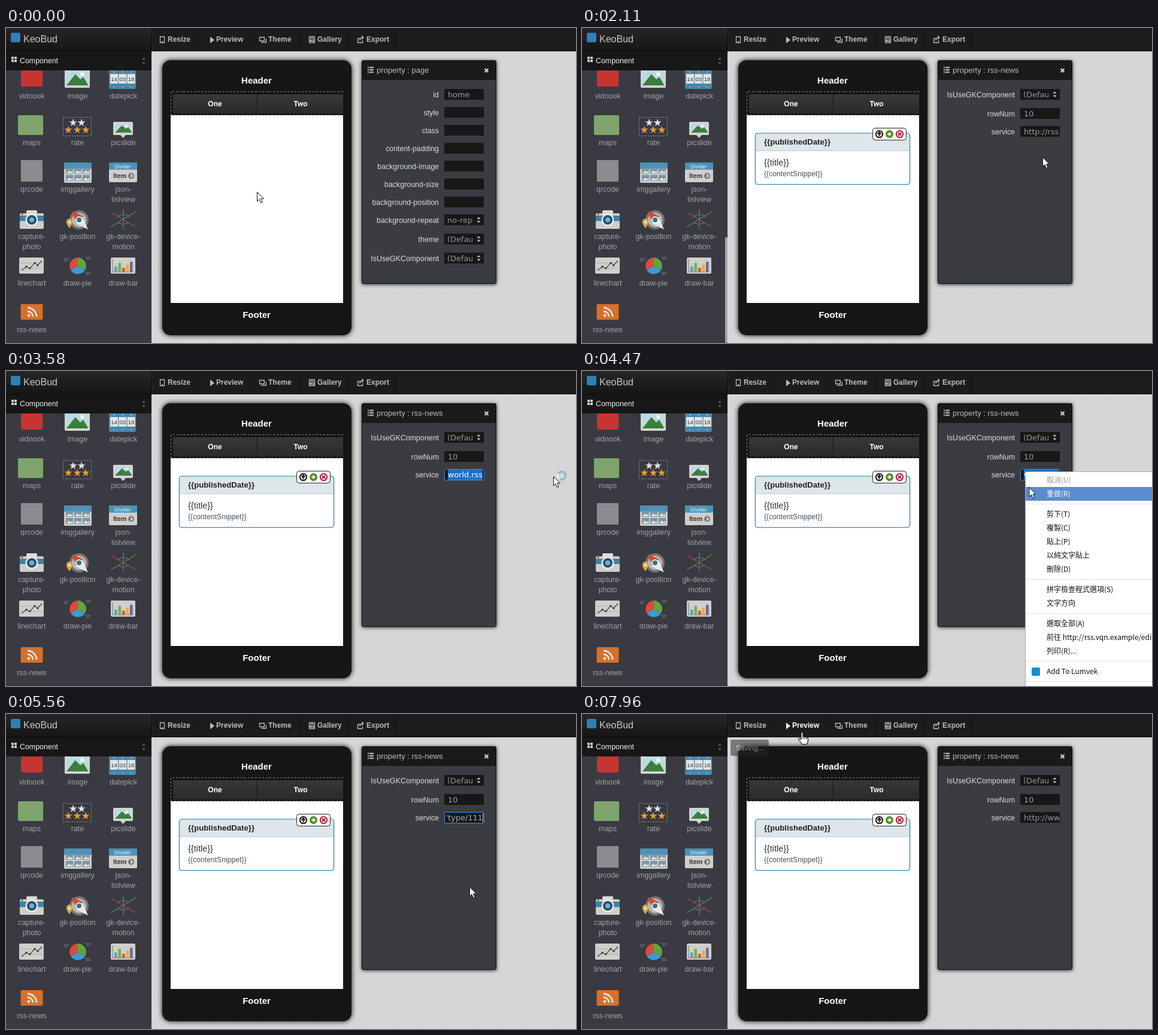
Animation of 952 by 527 pixels, one loop 8 s. Source, as an HTML page:

```html
<!DOCTYPE html>
<html lang="en">
<head>
<meta charset="utf-8">
<title>App builder</title>
<style>
html, body { margin: 0; width: 100%; height: 100%; overflow: hidden; background: #d6d6d6; }
svg { display: block; width: 952px; height: 527px; font-family: "Liberation Sans", Arial, sans-serif; }
text { white-space: pre; }
.b { font-weight: bold; }
.v { font-family: "DejaVu Sans", Verdana, sans-serif; }
.cjk { font-family: "Noto Sans CJK TC", "Noto Sans CJK", sans-serif; }
.m { text-anchor: middle; }
.e { text-anchor: end; }
</style>
</head>
<body>
<script>
const rect = (x, y, w, h, fill, more = '') => `<rect x="${x}" y="${y}" width="${w}" height="${h}" fill="${fill}" ${more}/>`;
const circle = (x, y, r, fill, more = '') => `<circle cx="${x}" cy="${y}" r="${r}" fill="${fill}" ${more}/>`;
const path = (d, fill = 'none', stroke = 'none', width = 1, more = '') =>
  `<path d="${d}" fill="${fill}" stroke="${stroke}" stroke-width="${width}" ${more}/>`;
const text = (x, y, s, size = 12.4, fill = '#ddd', cls = '', more = '') =>
  `<text x="${x}" y="${y}" font-size="${size}" fill="${fill}" class="${cls}" ${more}>${s}</text>`;
const group = (id, body, more = '') => `<g id="${id}" ${more}>${body}</g>`;

// Sidebar icons
const picture = (x, y, w, h) => rect(x, y, w, h, '#d4d4cc', 'rx="2"') + rect(x + 3, y + 3, w - 6, h - 6, '#b9dbe6') +
  path(`M${x + 3} ${y + h - 4}l${w * .35} ${-h * .55} ${w * .2} ${h * .25} ${w * .12} ${-h * .12} ${w * .2} ${h * .42}z`, '#3d7d3a') +
  circle(x + w * .7, y + h * .32, h * .1, '#f4f4e0');
const card = (x, y, w, h) => rect(x, y, w, h, '#cfcfcb', 'rx="2"');
const blueCard = (x, y, w, h) => card(x, y, w, h) + rect(x, y, w, 11, '#4b93b8', 'rx="2"');
const star = (x, y, fill) => text(x, y, '★', 17, fill, 'v m');
const feed = rect(-18.5, -13, 37, 26, '#f47b25', 'rx="2"') + circle(-5, 6, 2.4, '#fff') +
  path('M-7 -1a9 9 0 0 1 9 9M-7 -7a15 15 0 0 1 15 15', 'none', '#fff', 2.8);

const icons = [
  rect(25, 68, 36, 30, '#c93430', 'rx="3"'),
  picture(98, 66, 42, 34),
  rect(172, 66, 45, 36, '#4687ab', 'rx="3"') +
    [14, '03', 18].map((n, i) => rect(174 + 14.3 * i, 77, 13, 16, '#e4e4e0') + text(180.5 + 14.3 * i, 89, n, 9.5, '#333', 'm') +
      text(180.5 + 14.3 * i, 76, '+', 8, '#cde', 'm') + text(180.5 + 14.3 * i, 101, '−', 8, '#cde', 'm')).join(''),
  rect(20, 146, 42, 33, '#7fa56c', 'rx="2"'),
  rect(95.5, 149.5, 47, 31, 'none', 'stroke="#999" stroke-dasharray="2 2"') +
    [112, 126].map(x => star(x, 164, '#e4e4e4')).join('') + [104, 119, 133].map(x => star(x, 176, '#eca02c')).join(''),
  picture(179, 157, 33, 22) + path('M191 179h9l-4.500 5z', '#d4d4cc'),
  rect(25, 221, 36, 36, '#8c8c8e'),
  blueCard(97, 225, 46, 34) + [0, 1, 2, 3, 4, 5].map(i => {
    const x = 100 + i % 3 * 14, y = 234 + (i / 3 | 0) * 12;
    return rect(x, y, 12, 10, '#7d94a0') + path(`M${x + 1} ${y + 9}l4 -5 3 3 3 -2v4z`, '#dfe6e8');
  }).join(''),
  blueCard(172, 225, 47, 33) + rect(172, 233, 47, 4, '#4b93b8') + text(195, 235, 'Divider', 9, '#eef', 'm') +
    text(179, 251, 'Item', 11, '#333', 'b') + circle(209, 247.500, 5, '#777') + path('M208 245l3 2.500-3 2.500', 'none', '#fff', 1.5),
  card(23, 310, 40, 26) + rect(34, 305, 18, 8, '#dcdcd8', 'rx="2"') + rect(23, 314, 40, 9, '#3f83a6') +
    circle(43, 321, 10.500, '#eee') + circle(43, 321, 8, '#26506c') + circle(43, 321, 4, '#6fb2d4') + circle(27, 312, 1.5, '#c33'),
  circle(122, 321, 16, '#77777a') + circle(122, 321, 12, '#b9b9b6') + path('M109 306l20 9-11 11z', '#d9452c') +
    path('M137 337l-20-10 11-11z', '#e8e8e8') + circle(122, 321, 5, '#2f7393', 'stroke="#eee" stroke-width="2"') +
    path('M106 335q-6-8-5-11a5 5 0 0 1 10 0q0 3-5 11z', '#e0a737') + circle(106, 325, 2, '#fff'),
  path('M175 333L217 307', 'none', '#437f46', 1.5) + path('M176 309L216 332', 'none', '#8f4444', 1.5) +
    path('M196 303V337', 'none', '#4f6fa8', 1.5) + path('M186 316q10-8 20 0M187 325q8 6 18 0', 'none', '#777', 1.2),
  card(22, 384, 41, 27) + path('M24 393h37M24 402h37', 'none', '#aaa') +
    path('M26 406l8-7 6 3 8-9 5 4 7-8', 'none', '#444', 1.2) +
    [[34, 399], [40, 402], [48, 393], [53, 397]].map(([x, y]) => circle(x, y, 1.6, '#333')).join(''),
  path('M120 398V384a14 14 0 0 1 12 21z', '#62a53c') + path('M120 398L132 405a14 14 0 0 1-24 0z', '#3d9bd0') +
    path('M120 398L108 405a14 14 0 0 1 12-21z', '#dc4a38') +
    path('M97 386h9M97 389h6M133 384h9M135 387h6M132 409h9M134 412h7', 'none', '#96968f', 1, 'stroke-dasharray="3 1"'),
  card(175, 384, 41, 27) + path('M178 387v21h35', 'none', '#777') +
    [[9, '#5f9ec5'], [15, '#78ad4c'], [7, '#d0564a'], [12, '#e0b23c'], [17, '#79619c']]
      .map(([h, c], i) => rect(181 + 6.5 * i, 408 - h, 4.5, h, c)).join(''),
  group('feed', feed, 'transform="translate(43 475)"')
];
const labels = ['vidnook', 'image', 'datepick', 'maps', 'rate', 'picslide', 'qrcode', 'imggallery', 'json-/listview',
  'capture-/photo', 'gk-position', 'gk-device-/motion', 'linechart', 'draw-pie', 'draw-bar', 'rss-news'];
const rowY = [118, 196, 274, 353, 431, 509];
const sidebar = rect(0, 39, 243, 488, '#3a3a42') + icons.join('') +
  labels.map((s, i) => s.split('/').map((part, k) =>
    text(43 + 76.500 * (i % 3), rowY[i / 3 | 0] + 17 * k, part, 12.4, '#a2a2a2', 'm')).join('')).join('') +
  group('bar', rect(239, 350, 4, 177, '#a8a8ac', 'rx="2"')) +
  rect(0, 39, 243, 32, '#171717') + path('M9 48h4v4h-4zM14 48h4v4h-4zM9 53h4v4h-4zM14 53h4v4h-4z', '#ccc') +
  text(23, 59, 'Component', 12.4, '#eee') + path('M227 53l3-4 3 4zM227 57l3 4 3-4z', '#555');

const navItem = (x, s, icon, id) => group(id, text(x, 23, s, 12, 'currentColor', 'b') + icon, 'color="#bbb"');
const line = (d, width = 1.3) => path(d, 'none', 'currentColor', width);
const topBar = rect(0, 0, 952, 39, '#1c1c1c') + rect(0, 0, 243, 38, 'url(#brand)') + rect(0, 38, 952, 1, '#0a0a0a') +
  [243, 324, 408, 492, 572, 651].map(x => rect(x, 0, 1, 38, '#050505') + rect(x + 1, 0, 1, 38, '#2c2c2c')).join('') +
  rect(8, 8, 16, 16, '#2d7fba', 'rx="3"') + text(29, 24, 'KeoBud', 16, '#c8c8c8') +
  navItem(270, 'Resize', line('M257.500 14.500h7v10h-7zM260 23h2'), 'resize') +
  navItem(351, 'Preview', path('M341 14.500l7 5.500-7 5.500z', 'currentColor'), 'preview') +
  navItem(438, 'Theme', line('M423.500 15.500h8v6h-8zM426 24h8.500v-6'), 'theme') +
  navItem(520, 'Gallery', line('M506.500 14.500h9v10h-9zM508 17h6M508 20h3v2h-3zM512 20h3M512 22.500h3'), 'gallery') +
  navItem(602, 'Export', line('M592 17.500h-4.500v7h8v-4M591 21q0-5 6-5M594 13l3 3-3 3'), 'export');

const phone = rect(261, 54, 316, 460, '#181818', 'rx="14" filter="url(#halo)"') +
  text(418.5, 93, 'Header', 15, '#fff', 'b m') + text(418.5, 485, 'Footer', 15, '#fff', 'b m') +
  path('M563 106.500H275.500V145.500', 'none', '#8a8a8a', 1, 'stroke-dasharray="3 3"') +
  rect(279, 111, 140, 32, 'url(#button)') + rect(420, 111, 143, 32, 'url(#button)') +
  text(349, 131, 'One', 12, '#fff', 'b m') + text(492, 131, 'Two', 12, '#fff', 'b m') +
  rect(275, 146, 288, 314, '#fff') + path('M275 145.500h288', 'none', '#666', 1, 'stroke-dasharray="3 3"');

const widget = rect(289.5, 176, 258, 85.5, '#fff', 'rx="4" filter="url(#glow)"') +
  path('M290 206V180q0-4 4-4h249q4 0 4 4v26z', '#dde6e9') + rect(290, 205, 257, 1, '#c4ced2') +
  rect(289.5, 176, 258, 85.5, 'none', 'rx="4" stroke="#3a87b0" stroke-width="1.2"') +
  text(304, 195, '{{publishedDate}}', 13.15, '#222', 'b') + text(304, 230, '{{title}}', 14.5, '#333') +
  text(304, 248, '{{contentSnippet}}', 12.2, '#4a5560');
const ring = (x, c, d) => circle(x, 177.5, 5.6, '#fff', `stroke="${c}" stroke-width="2"`) + path(d, 'none', c, 2);
const tools = rect(485.5, 167.5, 56, 20, '#fff', 'rx="4" stroke="#222"') +
  ring(496.5, '#111', 'M496.500 181v-6M493.500 177.500l3-3 3 3') +
  circle(513.5, 177.5, 6.5, '#4f8a1c') + path('M510 177.500h7M513.500 174v7', 'none', '#fff', 2) +
  ring(530.5, '#b5173c', 'M528 175l5 5M533 175l-5 5');

const label = (y, s) => text(723, y + 4.5, s, 12.4, '#ddd', 'e');
const input = (y, name, value = '') => label(y, name) + rect(732, y - 9, 66, 18, '#171717') +
  text(738, y + 5, value, 12.9, '#999', 'v', 'clip-path="url(#field)"');
const select = (y, name, value) => label(y, name) + rect(732, y - 9, 66, 18, '#171717') +
  text(737, y + 5, value, 12.9, '#999', 'v', 'clip-path="url(#option)"') +
  path(`M786.500 ${y - 1.5}l3 -3.500 3 3.500zM786.500 ${y + 1.5}l3 3.500 3 -3.500z`, '#bbb');
const panel = rect(594.5, 54.5, 224, 373, '#3a3a42', 'rx="2" stroke="#111" filter="url(#shadow)"') +
  rect(595, 55, 223, 32, '#1a1a1a') + path('M604 66h2m1 0h7M604 70h2m1 0h7M604 74h2m1 0h7', 'none', '#aaa', 2.6) +
  text(619, 75, '', 13, '#bbb', '', 'id="title"') + path('M799.500 68l6 6M805.500 68l-6 6', 'none', '#ddd', 2) +
  group('pageProps', input(111, 'id', 'home') +
    ['style', 'class', 'content-padding', 'background-image', 'background-size', 'background-position']
      .map((s, i) => input(141 + 30 * i, s)).join('') +
    select(321, 'background-repeat', 'no-repeat') + select(353, 'theme', '(Default)') + select(385, 'IsUseGKComponent', '(Default)')) +
  group('feedProps', select(111, 'IsUseGKComponent', '(Default)') + input(143, 'rowNum', '10') + input(173, 'service') +
    rect(738, 165, 0, 17, '#1b6fc6', 'id="selection"') +
    text(738, 178, '', 12.9, '#999', 'v', 'id="service" clip-path="url(#field)"') +
    rect(732.5, 164.5, 66, 18, 'none', 'id="focus" stroke="#4a90d9" rx="1"') + rect(796, 166, 1, 15, '#ddd', 'id="caret"'));

const menuRows = [[182, '取消(U)'], [205, '重做(R)'], [239, '剪下(T)'], [262, '複製(C)'], [285, '貼上(P)'], [308, '以純文字貼上'],
  [331, '刪除(D)'], [365, '拼字檢查程式選項(S)'], [388, '文字方向'], [422, '選取全部(A)'],
  [445, '前往 http://rss.vqn.example/edit'], [468, '列印(R)...'], [502, 'Add To Lumvek']];
const menu = rect(740.5, 168.5, 230, 380, '#fff', 'stroke="#aaa"') + rect(741, 274, 211, 23, '#5b8bd0', 'id="hover"') +
  [222, 348, 405, 485, 519].map(y => rect(741, y, 211, 1, '#e4e4e4')).join('') +
  menuRows.map(([y, s], i) => text(776, y + 4.5, s, 12, '', 'cjk', `id="row${i}"`)).join('') + rect(751, 496, 14, 14, '#1a8fd0', 'rx="2"');

const cursors = group('arrow', path('M.5 .5V16l3.500-3.400 2.500 6 2.700-1.100-2.500-5.800h4.800z', '#fff', '#111')) +
  group('beam', path('M-3 0q3 0 3 2 0-2 3-2M0 2v13M-3 17q3 0 3-2 0 2 3 2', 'none', '#ccc', 1.2, 'transform="translate(0 -8)"')) +
  group('deny', circle(0, 0, 10, '#fff') + circle(0, 0, 7.2, '#fff', 'stroke="#111" stroke-width="2.6"') + path('M-5 -5L5 5', 'none', '#111', 2.6)) +
  group('hand', path('M0 1.500q2-2 3 0V8q1.500-1 3 .5 2-.8 3 .7 2-.6 2.500 1.300V15l-2 5.500H1.500L-4 13q-1-3 1.500-2.500L0 12.500z', '#fff', '#111', 1.1) +
    path('M3 8v4M6 9v3M9 9.500v3', 'none', '#111')) +
  group('busy', circle(0, 0, 6.5, 'none', 'stroke="#8fb9c9" stroke-width="3.5"') + path('M0 -6.500A6.500 6.500 0 0 1 6.500 0', 'none', '#e2f4fa', 3));

const shade = (id, dy, blur, color, opacity) => `<filter id="${id}" x="-10%" y="-10%" width="120%" height="120%">
  <feDropShadow dx="0" dy="${dy}" stdDeviation="${blur}" flood-color="${color}" flood-opacity="${opacity}"/></filter>`;
const gradient = (id, top, bottom) =>
  `<linearGradient id="${id}" x2="0" y2="1"><stop stop-color="${top}"/><stop offset="1" stop-color="${bottom}"/></linearGradient>`;
document.body.innerHTML = '<svg viewBox="0 0 952 527"><defs>' +
  shade('shadow', 1, 3, '#000', .85) + shade('halo', 0, 4, '#000', 1) + shade('glow', .5, 1.2, '#3a9fd0', .7) +
  gradient('button', '#383838', '#2a2a2a') + gradient('brand', '#262626', '#161616') +
  `<clipPath id="field">${rect(737, 90, 60, 320, '#000')}</clipPath><clipPath id="option">${rect(736, 90, 43, 320, '#000')}</clipPath>
  <pattern id="grain" width="44" height="36" patternUnits="userSpaceOnUse">${rect(0, 0, 44, 36, '#d6d6d6')}
    ${path('M4 7h2M19 3h1M31 14h2M11 24h1M38 29h2M25 32h1', 'none', '#cecece')}</pattern></defs>` +
  rect(243, 39, 709, 488, 'url(#grain)') + phone + sidebar + topBar + group('widget', widget) + group('tools', tools) + panel +
  group('saving', rect(248, 43, 64, 27, '#222', 'rx="3"') + text(257, 61, 'Saving...', 12, '#eee')) +
  group('ghost', feed, 'opacity=".72"') + group('menu', menu) + cursors + '</svg>';

const $ = id => document.getElementById(id);
const show = (id, on) => { $(id).style.display = on ? '' : 'none'; };
const move = (id, x, y, more = '') => $(id).setAttribute('transform', `translate(${x} ${y})${more}`);
const set = (id, name, value) => $(id).setAttribute(name, value);

// Keys are [time, x, y]
const pointerPath = [[60, 419, 274], [600, 43, 470], [930, 43, 470], [1050, 151, 374], [1350, 420, 240], [1750, 420, 240],
  [2110, 769, 216], [2400, 739, 172], [2590, 739, 172], [3250, 915, 176], [3580, 915, 176], [3760, 724, 172], [4020, 724, 172],
  [4080, 739, 169], [4340, 739, 169], [4960, 774, 289], [6090, 774, 289], [6270, 718, 269], [6470, 718, 269], [6600, 721, 270],
  [7120, 721, 270], [7840, 366, 30]];
const ghostPath = [[930, 43, 475], [1050, 155, 425], [1350, 440, 270]];
function at(keys, t) {
  const i = keys.findIndex(k => k[0] > t);
  if (i < 0) return keys[keys.length - 1].slice(1);
  if (!i) return keys[0].slice(1);
  const a = keys[i - 1], b = keys[i], p = (t - a[0]) / (b[0] - a[0]);
  return [a[1] + (b[1] - a[1]) * p, a[2] + (b[2] - a[2]) * p];
}
const ramp = (t, from, to) => Math.min(1, Math.max(0, (t - from) / (to - from)));

function draw(t) {
  const [x, y] = at(pointerPath, t), during = (a, b) => t >= a && t < b;
  const selected = t >= 1750, menuOpen = during(4340, 5560), dragging = during(930, 1350);
  set('bar', 'opacity', ramp(t, 240, 360) * (1 - ramp(t, 2350, 2530)));
  set('feed', 'opacity', during(540, 1750) ? 1 : .84);
  show('widget', t >= 1350);
  show('tools', selected);
  show('pageProps', !selected);
  show('feedProps', selected);
  $('title').textContent = 'property : ' + (selected ? 'rss-news' : 'page');

  const scrolled = during(2590, 5560) && (x > 798 || t > 3250), pasted = during(5560, 7120), atEnd = scrolled || pasted;
  $('service').textContent = pasted ? '/type/111' : scrolled ? 'world.rss' : t < 5560 ? 'http://rss.' : 'http://www.';
  set('service', 'x', atEnd ? 796 : 738);
  set('service', 'class', atEnd ? 'v e' : 'v');
  set('service', 'fill', scrolled ? '#fff' : pasted ? '#aaa' : '#999');
  set('selection', 'width', scrolled ? 58 : during(2590, 3250) ? Math.max(0, x - 738) : 0);
  show('focus', during(2530, 7120));
  show('caret', pasted && (t - 5560) % 1040 < 520);

  show('menu', menuOpen);
  const row = menuRows.findIndex(([ry], i) => i && x > 740 && Math.abs(y - ry) < 11.5);
  show('hover', row > 0);
  if (row > 0) set('hover', 'y', menuRows[row][0] - 11);
  menuRows.forEach((_, i) => set('row' + i, 'fill', !i ? '#999' : i === row ? '#fff' : '#111'));

  set('saving', 'opacity', .8 * (t < 5000 ? ramp(t, 2400, 2600) * (1 - ramp(t, 3050, 3250)) : ramp(t, 7840, 8030)));
  show('ghost', dragging);
  move('ghost', ...at(ghostPath, t));

  const overPreview = y < 38 && x < 408;
  set('preview', 'color', overPreview ? '#fff' : '#bbb');
  const inField = selected && !menuOpen && x > 732 && x < 798 && y > 164 && y < 182;
  const kind = dragging && x < 261 ? 'deny' : overPreview ? 'hand' : inField ? 'beam' : 'arrow';
  for (const id of ['arrow', 'beam', 'deny', 'hand']) {
    show(id, id === kind);
    move(id, x, y);
  }
  show('busy', during(3580, 3640));
  move('busy', x + 14, y - 1, ` rotate(${t * .36})`);
}

const start = performance.now();
function tick() {
  draw((performance.now() - start) % 8000);
  requestAnimationFrame(tick);
}
tick();
</script>
</body>
</html>
```
